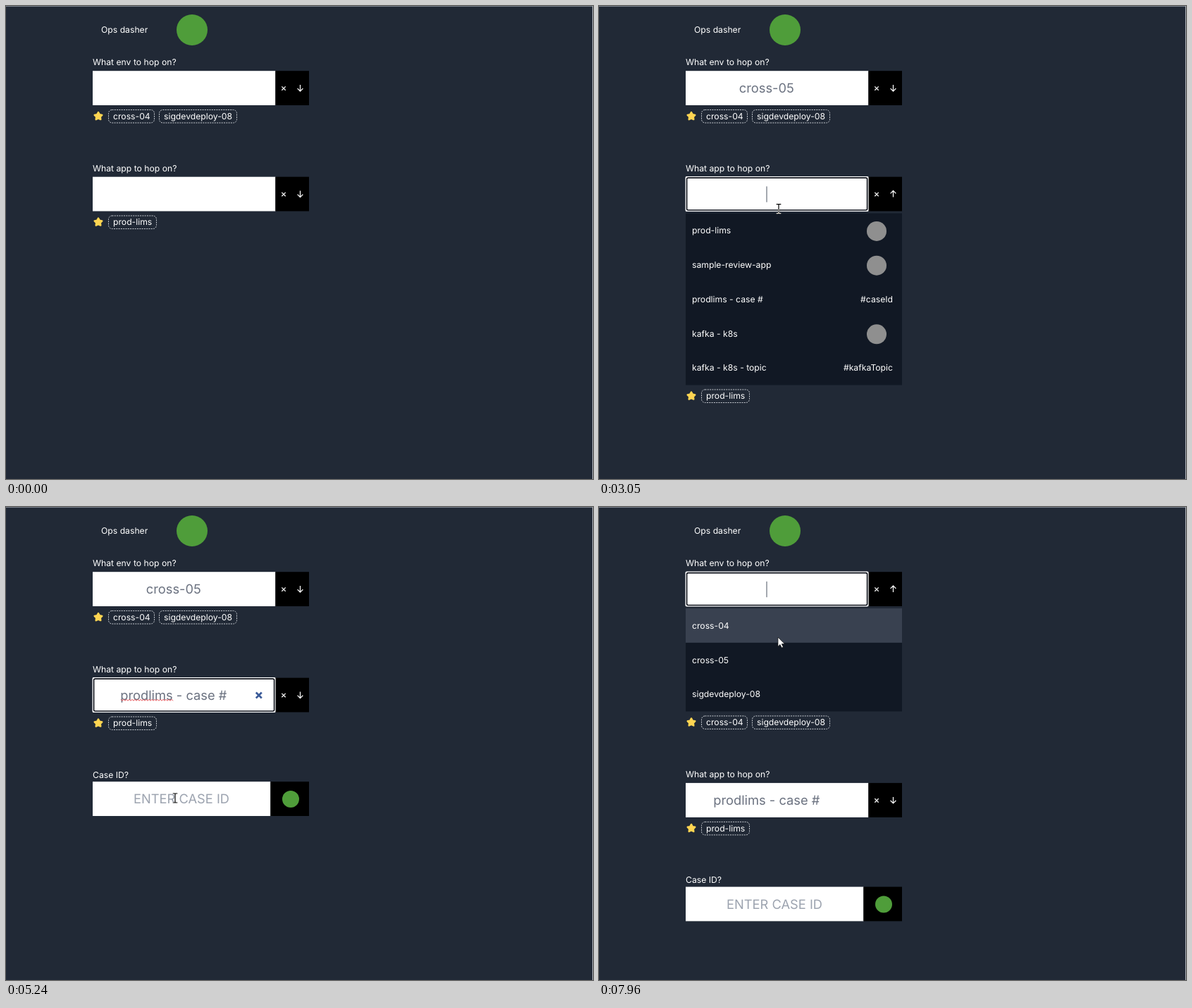
Recreate the animation shown at these times as an HTML page. Size 833 by 672 pixels, loop 8000 ms.

```html
<!DOCTYPE html>
<html lang="en">
<head>
<meta charset="utf-8">
<title>Ops dasher</title>
<style>
  html, body { margin: 0; width: 100%; height: 100%; overflow: hidden; background: #212936; }
  svg { display: block; width: 833px; height: 672px; background: #212936; }
  text { font: 12.2px Inter, "Liberation Sans", sans-serif; fill: #fff; text-rendering: geometricPrecision; white-space: pre; }
  .big { font-size: 18.3px; fill: #6b7280; text-anchor: middle; }
  .hint { fill: #9ca3af; }
  .end { text-anchor: end; }
  .line { fill: none; stroke: #fff; stroke-width: 1.25; }
  .chip { fill: none; stroke: #c6cad0; stroke-width: 1; stroke-dasharray: 2 1.3; }
  .star { fill: #ffd552; stroke: #ffd552; stroke-width: 2.4; stroke-linejoin: round; }
  .clear { fill: none; stroke: #3a5a98; stroke-width: 2.6; }
  .caret { fill: #4b5563; }
  .beam { fill: none; stroke: #fff; stroke-width: 1.2; mix-blend-mode: difference; }
</style>
</head>
<body>
<svg id="stage" viewBox="0 0 833 672"></svg>
<script>
const LOOP = 8000, ROW = 48.8, LEFT = 123, RIGHT = 430, APP_Y = 150.5;

// Bursts of screen updates: start, end, number of steps
const BURSTS = [
  [250, 1010, 12], [1080, 1350, 5], [1740, 2090, 6], [2240, 2570, 5],
  [2770, 3570, 12], [3630, 4380, 12], [4450, 5240, 13], [5310, 6060, 12],
  [6150, 6380, 5], [6780, 7560, 13], [7830, 7960, 3]
];

// Pointer path: time, x, y
const PATH = [
  [250, 821, 653], [420, 800, 600], [660, 592, 440], [840, 345, 205], [1010, 212, 95],
  [1080, 207, 102], [1150, 205, 106], [1350, 205, 106],
  [1740, 208, 118], [1880, 228, 170], [2090, 250, 221], [2570, 250, 221],
  [2770, 251, 230], [2910, 254, 272], [3060, 255, 288], [3200, 255, 300],
  [3420, 257, 390], [3570, 257, 421], [4450, 257, 421],
  [5100, 244, 415], [5240, 240, 413.5],
  [5310, 258, 402], [5650, 485, 231], [5860, 620, 290], [6060, 685, 430],
  [6150, 730, 490], [6210, 772, 515], [6300, 822, 632], [6360, 833, 650],
  [6780, 719, 587], [6950, 560, 370], [7110, 400, 185], [7230, 355, 124],
  [7430, 354, 116], [7560, 352, 113], [7830, 322, 135], [7895, 280, 164], [7960, 254, 185]
];

// Interface states: time, focused field, open list, env value, app value, blink start
const STATES = [
  [0, "", "", "", "", 0],
  [1140, "env", "", "", "", 1220],
  [1210, "env", "env", "", "", 1220],
  [2320, "env", "", "cross-05", "", 2320],
  [2910, "app", "", "cross-05", "", 2980],
  [2980, "app", "app", "cross-05", "", 2980],
  [3760, "app", "", "cross-05", "prodlims - case #", 4245],
  [7490, "env", "", "", "prodlims - case #", 7490],
  [7550, "env", "env", "", "prodlims - case #", 7490]
];

const SECTIONS = {
  env: {
    y: 0, label: "What env to hop on?",
    chips: [["cross-04", 145.5, 65], ["sigdevdeploy-08", 217.5, 110]],
    items: [["cross-04"], ["cross-05"], ["sigdevdeploy-08"]]
  },
  app: {
    y: APP_Y, label: "What app to hop on?",
    chips: [["prod-lims", 145.5, 68]],
    items: [["prod-lims", "icon"], ["sample-review-app", "icon"], ["prodlims - case #", "#caseId"],
            ["kafka - k8s", "icon"], ["kafka - k8s - topic", "#kafkaTopic"]]
  }
};

const stage = document.getElementById("stage");

function add(parent, tag, attrs = {}, text = "") {
  const el = document.createElementNS("http://www.w3.org/2000/svg", tag);
  for (const k in attrs) el.setAttribute(k, attrs[k]);
  if (text) el.textContent = text;
  parent.append(el);
  return el;
}
const rect = (p, x, y, width, height, fill, more) => add(p, "rect", { x, y, width, height, fill, ...more });
const label = (p, x, y, text, cls = "") => add(p, "text", { x, y, class: cls }, text);
const path = (p, d, cls) => add(p, "path", { d, class: cls });
const disc = (p, cx, cy, r, fill) => add(p, "circle", { cx, cy, r, fill });
const show = (el, on) => el.setAttribute("display", on ? "inline" : "none");
const shift = (el, x, y) => el.setAttribute("transform", `translate(${x} ${y})`);

function starPath(cx, cy) {
  const pts = [];
  for (let i = 0; i < 10; i++) {
    const a = Math.PI * (i / 5 - 0.5), r = i % 2 ? 3 : 5.6;
    pts.push((cx + r * Math.cos(a)).toFixed(2) + " " + (cy + r * Math.sin(a)).toFixed(2));
  }
  return "M" + pts.join("L") + "Z";
}

function wave(x0, x1, y) {
  let d = `M${x0} ${y}`;
  for (let x = x0 + 2, i = 0; x <= x1; x += 2, i++) d += `L${x} ${y + (i % 2 ? 0 : 2)}`;
  return d;
}

function makeSection(s) {
  const g = add(stage, "g");
  label(g, LEFT, 84, s.label);
  rect(g, LEFT, 92.2, 259.5, 48.8, "#fff");
  rect(g, 382.3, 92.2, 47.7, 48.8, "#000");
  path(g, "M391.3 114.4l5.4 5.4m0 -5.4l-5.4 5.4", "line");
  s.down = path(g, "M417.5 112v9m-3.9 -3.9l3.9 3.9l3.9 -3.9", "line");
  s.up = path(g, "M417.5 121v-9m-3.9 3.9l3.9 -3.9l3.9 3.9", "line");

  s.ring = add(g, "g");
  rect(s.ring, 122.5, 91.5, 260, 50, "#fff", { rx: 2 });
  rect(s.ring, 124.6, 93.6, 256, 45.9, "none", { rx: 2, stroke: "#0b0f18", "stroke-width": 1.6 });

  s.value = label(g, 237.8, 123.4, "", "big");
  s.clear = path(g, "M354.8 113l8 8m0 -8l-8 8", "clear");
  s.caret = rect(g, 0, 105.8, 1, 22.4, "", { class: "caret" });

  s.list = add(g, "g");
  rect(s.list, LEFT, 144, RIGHT - LEFT, ROW * s.items.length, "#111824");
  s.hover = rect(s.list, LEFT, 144, RIGHT - LEFT, ROW, "#394150");
  s.items.forEach(([name, side], i) => {
    const mid = 144 + ROW * (i + 0.5);
    label(s.list, 132, mid + 4.3, name);
    if (side === "icon") disc(s.list, 394, mid + 1, 14, "#8f8f8f");
    else if (side) label(s.list, 417, mid + 4.3, side, "end");
  });

  s.foot = add(g, "g");
  path(s.foot, starPath(131, 156.6), "star");
  for (const [name, x, w] of s.chips) {
    rect(s.foot, x, 147.5, w, 18.5, "none", { rx: 5, class: "chip" });
    label(s.foot, x + 6.5, 160.9, name);
  }
  s.group = g;
}

label(stage, 135, 38, "Ops dasher");
disc(stage, 264, 34, 22, "#4f9d3a");
makeSection(SECTIONS.env);
makeSection(SECTIONS.app);
const squiggle = path(SECTIONS.app.group, wave(163, 237, 122.8), "line");
squiggle.style.cssText = "stroke:#e5484d;stroke-width:1";

const caseBox = add(stage, "g");
label(caseBox, LEFT, 385, "Case ID?");
rect(caseBox, LEFT, 390.2, 252.5, 48.8, "#fff");
rect(caseBox, 375.3, 390.2, 54.7, 48.8, "#000");
label(caseBox, 249, 421.3, "ENTER CASE ID", "big hint");
disc(caseBox, 404, 415, 12, "#4f9d3a");

rect(stage, 0, 0, 833, 1, "#7c838d");
rect(stage, 832, 0, 1, 672, "#a9adb4");

const arrow = add(stage, "path", {
  d: "M0 0V13.2L3 10.4L5.2 15L7.4 14L5.3 9.6H9.4Z", fill: "#fff", stroke: "#111", "stroke-width": 0.7
});
const beam = path(stage, "M-3.3 -6.5H-0.8Q0 -6.5 0 -5.7Q0 -6.5 0.8 -6.5H3.3M0 -6V6M-3.3 6.5H-0.8Q0 6.5 0 5.7Q0 6.5 0.8 6.5H3.3", "beam");

// Time of the latest screen update
function snap(t) {
  let out = 0;
  for (const [a, b, n] of BURSTS) {
    if (t < a) break;
    const step = (b - a) / (n - 1);
    out = Math.min(b, a + Math.floor((t - a) / step + 0.2) * step);
  }
  return out;
}

function pointerAt(t) {
  const i = PATH.findIndex(k => k[0] > t);
  if (i === 0) return PATH[0].slice(1);
  if (i < 0) return PATH[PATH.length - 1].slice(1);
  const [t0, x0, y0] = PATH[i - 1], [t1, x1, y1] = PATH[i];
  const p = (t - t0) / (t1 - t0);
  return [x0 + (x1 - x0) * p, y0 + (y1 - y0) * p];
}

const listHeight = s => ROW * s.items.length + 3;

function draw(time) {
  const t = snap(time);
  const [, focus, open, env, app, blink] = STATES.filter(s => s[0] <= t).pop();
  const [px, py] = pointerAt(t);
  const values = { env, app };
  const lit = t < blink || (t - blink) % 1000 < 500;
  let push = 0, overText = false;

  for (const id in SECTIONS) {
    const s = SECTIONS[id], top = s.y + push, value = values[id];
    const isOpen = open === id, focused = focus === id;
    const inField = px > LEFT && px < 382 && py > top + 92 && py < top + 141;
    overText = overText || inField;
    shift(s.group, 0, top);
    show(s.up, isOpen);
    show(s.down, !isOpen);
    show(s.ring, focused);
    show(s.list, isOpen);
    if (s.value.textContent !== value) s.value.textContent = value;
    show(s.clear, value && (focused || inField));
    show(s.caret, focused && lit);
    s.caret.setAttribute("x", value ? (id === "app" ? 313 : 276.5) : 237.5);
    const row = Math.floor((py - top - 144) / ROW);
    show(s.hover, row >= 0 && row < s.items.length && px > LEFT && px < RIGHT);
    s.hover.setAttribute("y", 144 + ROW * row);
    if (isOpen) push += listHeight(s);
    shift(s.foot, 0, isOpen ? listHeight(s) : 0);
  }

  show(squiggle, focus === "app" && t >= 4450);
  shift(caseBox, 0, push);
  caseBox.setAttribute("opacity", Math.max(0, Math.min(1, (t - 4400) / 300)));
  if (app && px > LEFT && px < 375 && py > 390 + push && py < 439 + push) overText = true;

  const visible = t >= 250 && !(t > 6350 && t < 6780);
  show(beam, visible && overText);
  show(arrow, visible && !overText);
  shift(beam, px, py);
  shift(arrow, px, py);
}

const start = performance.now();
function tick() {
  draw((performance.now() - start) % LOOP);
  requestAnimationFrame(tick);
}
tick();
</script>
</body>
</html>
```
